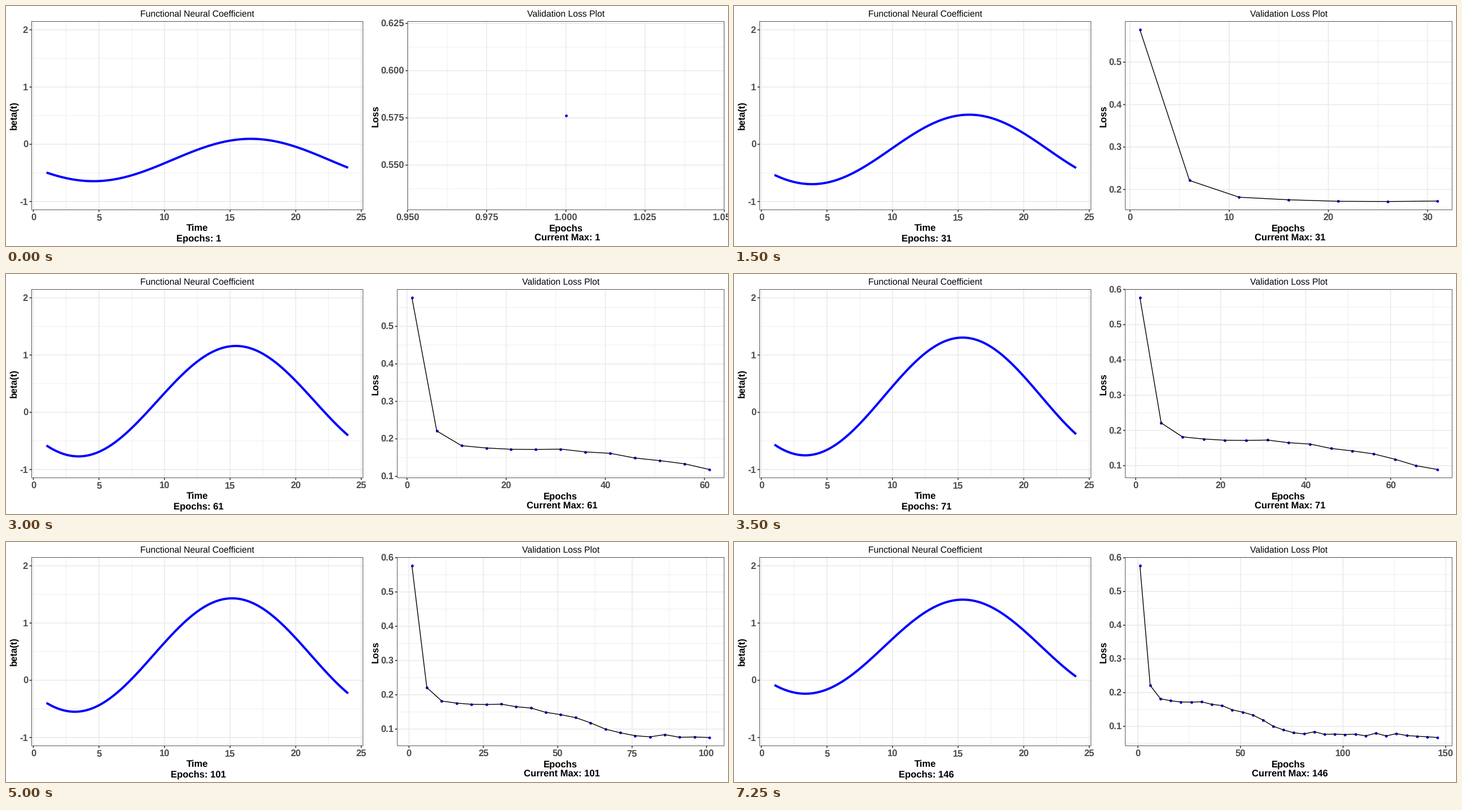
Write a matplotlib script that moves like this. It is 1280 px wide and 427 px high and loops after 7500 ms.

```python
import math
import numpy as np
import matplotlib as mpl
import matplotlib.pyplot as plt
from matplotlib.animation import FuncAnimation

W, H, DPI = 1280, 427, 64
PX = 72 / DPI  # points per pixel
FRAMES, STEP_MS = 30, 250
TOP, BOTTOM = 27.1, 363.1
INK, TICK_TEXT, GRID, BLUE = "#333333", "#4d4d4d", "#ebebeb", "#0000ff"

mpl.rcParams.update({
    "font.family": "Liberation Sans",
    "path.snap": False,
    "text.hinting": "none",
    "toolbar": "None",
})

# Validation loss, one value every five epochs
LOSS = np.array([
    .5762, .2212, .1818, .1757, .1722, .1717, .1727, .1652, .1614, .1488,
    .1420, .1334, .1183, .1000, .0892, .0807, .0773, .0838, .0760, .0768,
    .0754, .0766, .0716, .0795, .0713, .0783, .0725, .0705, .0688, .0667])
EPOCH = 1 + 5 * np.arange(FRAMES)

# Coefficient curve: mean, amplitude and time of the minimum
KNOTS = np.array([0, 6, 12, 17, 20, 24, 29])
WAVE = np.array([
    [-.275, .370, 4.58],
    [-.090, .607, 3.85],
    [.194, .965, 3.44],
    [.379, 1.060, 3.23],
    [.441, .991, 3.16],
    [.512, .916, 3.18],
    [.587, .822, 3.36]])
SLOPE = np.gradient(WAVE, KNOTS, axis=0)


def wave_at(i):
    """Cubic Hermite interpolation of the curve parameters."""
    k = min(np.searchsorted(KNOTS, i, side="right") - 1, len(KNOTS) - 2)
    h = KNOTS[k + 1] - KNOTS[k]
    s = (i - KNOTS[k]) / h
    return ((2 * s**3 - 3 * s**2 + 1) * WAVE[k]
            + (s**3 - 2 * s**2 + s) * h * SLOPE[k]
            + (3 * s**2 - 2 * s**3) * WAVE[k + 1]
            + (s**3 - s**2) * h * SLOPE[k + 1])


def nice_breaks(lo, hi, m=5):
    """Extended Wilkinson tick search."""
    nice = [1, 5, 2, 2.5, 4, 3]
    span = hi - lo
    best, ticks = -9, None
    for j in (1, 2):
        for rank, q in enumerate(nice):
            for k in range(2, 12):
                z0 = math.ceil(math.log10(span / (k + 1) / j / q))
                for z in (z0, z0 + 1):
                    step = j * q * 10.0**z
                    first = math.floor(hi / step) * j - (k - 1) * j
                    last = math.ceil(lo / step) * j
                    for start in range(first, last + 1):
                        a = start * step / j
                        b = a + step * (k - 1)
                        zero = start % j == 0 and a <= 0 <= b
                        simple = 1 - rank / (len(nice) - 1) - j + zero
                        cover = 1 - .5 * ((hi - b)**2 + (lo - a)**2) / (.1 * span)**2
                        r = (k - 1) / (b - a)
                        rt = (m - 1) / (max(b, hi) - min(a, lo))
                        dense = 2 - max(r / rt, rt / r)
                        score = .25 * simple + .2 * cover + .5 * dense
                        if score > best + 1e-10:
                            best, ticks = score, a + step * np.arange(k)
    return ticks


def inside(v, lo, hi):
    tol = 1e-9 * (hi - lo)
    return v[(v >= lo - tol) & (v <= hi + tol)]


def grid_breaks(lo, hi):
    major = nice_breaks(lo, hi)
    half = (major[1] - major[0]) / 2
    minor = major[0] - half + 2 * half * np.arange(len(major) + 1)
    return inside(major, lo, hi), inside(minor, lo, hi)


def decimals(values):
    for d in range(6):
        if np.allclose(values, np.round(values, d), rtol=0, atol=1e-8):
            return d
    return 6


def expand(v):
    lo, hi = v.min(), v.max()
    pad = .05 * (hi - lo) if hi > lo else .05
    return lo - pad, hi + pad


fig = plt.figure(figsize=(W / DPI, H / DPI), dpi=DPI, facecolor="white")
ax = fig.add_axes([0, 0, 1, 1])


def line(x, y, color, width, z, **kw):
    ax.plot(x, y, color=color, lw=width * PX, zorder=z,
            solid_capstyle="butt", **kw)


def text(x, y, s, size=16.6, color="black", weight="bold", ha="center", **kw):
    ax.text(x, y, s, fontsize=size * PX, color=color, weight=weight,
            ha=ha, va="baseline", zorder=9, **kw)


def panel(right, xlim, ylim, title, xlab, sub, ylab, ylab_x, left_for):
    """Draw one framed plot and return its data-to-pixel mapping."""
    xmaj, xmin = grid_breaks(*xlim)
    ymaj, ymin = grid_breaks(*ylim)
    dx, dy = decimals(xmaj), decimals(ymaj)
    left = left_for(dy)
    mid = (left + right) / 2

    def px(v):
        return left + (v - xlim[0]) / (xlim[1] - xlim[0]) * (right - left)

    def py(v):
        return BOTTOM - (v - ylim[0]) / (ylim[1] - ylim[0]) * (BOTTOM - TOP)

    for xs, ys, width, z in ((xmin, ymin, .84, 1), (xmaj, ymaj, 1.68, 2)):
        for x in px(xs):
            line([x, x], [TOP, BOTTOM], GRID, width, z)
        for y in py(ys):
            line([left, right], [y, y], GRID, width, z)

    e = .42
    line([left + e, right - e, right - e, left + e, left + e],
         [TOP + e, TOP + e, BOTTOM - e, BOTTOM - e, TOP + e], INK, .84, 6,
         solid_joinstyle="miter")

    for v in xmaj:
        x = px(v)
        line([x, x], [BOTTOM, BOTTOM + 3.3], INK, 1.68, 6)
        text(x, 381.7, f"{v:.{dx}f}", color=TICK_TEXT)
    for v in ymaj:
        y = py(v)
        line([left - 3.3, left], [y, y], INK, 1.68, 6)
        text(left - 5.9, y + 6, f"{v:.{dy}f}", color=TICK_TEXT, ha="right")

    text(mid, 18.4, title, size=15.7, weight="normal")
    text(mid, 400, xlab)
    text(mid + 2.3, 418, sub)
    text(ylab_x, 195.1, ylab, rotation=90, rotation_mode="anchor")
    return px, py


def draw(i):
    ax.clear()
    ax.set(xlim=(0, W), ylim=(H, 0))
    ax.axis("off")
    epoch = EPOCH[i]

    px, py = panel(633.3, (-.15, 25.15), (-1.15, 2.15),
                   "Functional Neural Coefficient", "Time",
                   f"Epochs: {epoch}", "beta(t)", 18.6, lambda d: 45)
    mean, amp, low = wave_at(i)
    t = np.linspace(1, 24, 93)
    line(px(t), py(mean - amp * np.cos(2 * np.pi * (t - low) / 24)), BLUE, 4, 5)

    x, y = EPOCH[:i + 1], LOSS[:i + 1]
    px, py = panel(1273.5, expand(x), expand(y),
                   "Validation Loss Plot", "Epochs",
                   f"Current Max: {epoch}", "Loss", 659.5,
                   lambda d: 693.3 + 9.2 * (d - 1))
    ax.plot(px(x), py(y), "o", color=BLUE, ms=4.9 * PX, mew=0, zorder=4)
    line(px(x), py(y), "black", 1.4, 5)
    return []


anim = FuncAnimation(fig, draw, frames=FRAMES, init_func=lambda: draw(0),
                     interval=STEP_MS, repeat=True, repeat_delay=0, blit=False)
plt.show()
```
